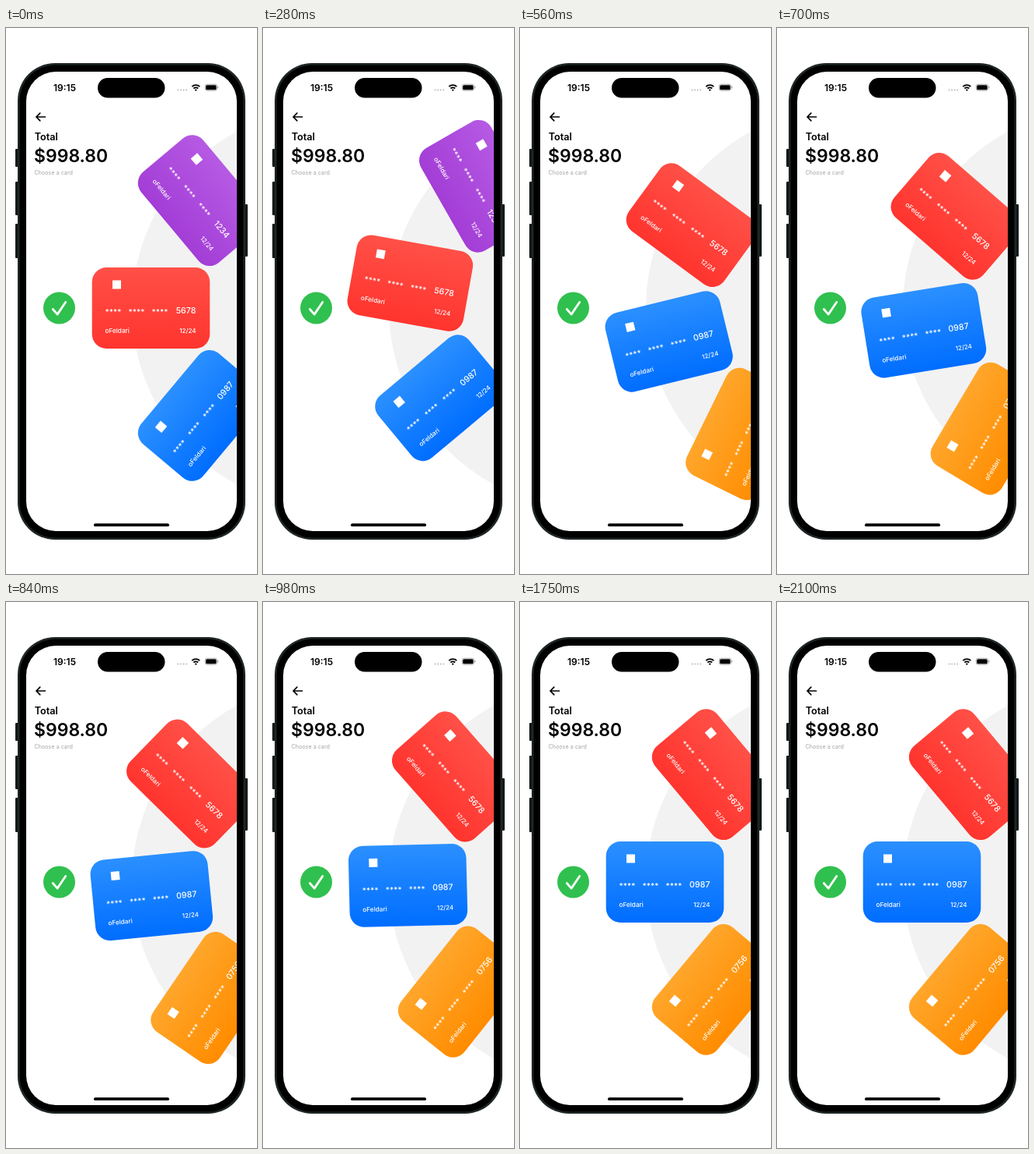
An HTML page for the animation above (2.16 s loop, 323 px wide and 700 px high).

```html
<!DOCTYPE html>
<html lang="en">
<head>
<meta charset="utf-8">
<title>Card wheel</title>
<style>
  html, body { margin: 0; width: 100%; height: 100%; overflow: hidden; background: #fff; }
  svg { display: block; width: 323px; height: 700px; font-family: Inter, Roboto, sans-serif; }
</style>
</head>
<body>
<svg viewBox="0 0 323 700">
  <defs>
    <clipPath id="screen"><rect x="26" y="56" width="271" height="589" rx="38"/></clipPath>
  </defs>

  <!-- phone body -->
  <g fill="#141818">
    <rect x="12" y="155" width="5" height="23" rx="1"/>
    <rect x="12" y="197" width="5" height="43" rx="1"/>
    <rect x="12" y="251" width="5" height="44" rx="1"/>
    <rect x="306" y="226" width="5" height="67" rx="1"/>
  </g>
  <rect x="15" y="45" width="293" height="611" rx="48" fill="#1f2627"/>
  <rect x="17.5" y="47.5" width="288" height="606" rx="46"/>
  <rect x="26" y="56" width="271" height="589" rx="38" fill="#fff"/>

  <g clip-path="url(#screen)">
    <circle cx="419" cy="359" r="257" fill="#f2f2f2"/>
    <g id="wheel"></g>
  </g>

  <!-- status bar -->
  <rect x="118" y="64" width="86.5" height="25.5" rx="12.75"/>
  <text x="61" y="81" font-size="12" font-weight="600">19:15</text>
  <path d="M221.5 79.5h12" stroke="#b5b5b5" stroke-width="1.8" stroke-linecap="round" stroke-dasharray="0 3.6"/>
  <g fill="none" stroke="#000" stroke-width="1.8">
    <path d="M239.3 75.2a7 7 0 0 1 10 0M241.4 77.5a4.1 4.1 0 0 1 5.8 0"/>
  </g>
  <path d="M242.8 79.2a2.2 2.2 0 0 1 3 0l-1.5 1.7z"/>
  <rect x="256.2" y="72.2" width="15.4" height="8" rx="2.5" fill="none" stroke="#999" stroke-width=".8"/>
  <rect x="257.2" y="73.2" width="13.4" height="6" rx="1.5"/>
  <rect x="272.3" y="74.8" width="1" height="2.8" rx=".5" fill="#999"/>

  <!-- header -->
  <path d="M50.5 114H39M43.8 109.2L39 114l4.8 4.8" fill="none" stroke="#000" stroke-width="1.7" stroke-linecap="round" stroke-linejoin="round"/>
  <text x="36.7" y="143.5" font-size="12.7" font-weight="600">Total</text>
  <text x="36" y="172.3" font-size="23" font-weight="600">$998.80</text>
  <text x="36.5" y="187.7" font-size="7.2" fill="#a3a3a3">Choose a card</text>

  <circle cx="68.5" cy="359" r="20.5" fill="#30c04f"/>
  <path d="M60.3 360.5l5.8 6.6 10.6-15.6" fill="none" stroke="#fff" stroke-width="2.8" stroke-linecap="round" stroke-linejoin="round"/>
  <rect x="113" y="635.3" width="97" height="3.8" rx="1.9"/>
</svg>

<script>
const LOOP = 2160, STEP = 70, SPACING = 50;
const HUB = "366.5 359";
const wheel = document.getElementById("wheel");

const cards = [
  { slot: -1, number: "1234", top: "#b65ae4", bottom: "#a33dd6" },
  { slot: 0, number: "5678", top: "#ff5047", bottom: "#ff342e" },
  { slot: 1, number: "0987", top: "#2b90ff", bottom: "#006dff" },
  { slot: 2, number: "0756", top: "#ffa62b", bottom: "#ff8c00" }
];

const cardMarkup = ({ number, top, bottom }, i) => `
  <g>
    <linearGradient id="fill${i}" x2="0" y2="1">
      <stop stop-color="${top}"/><stop offset="1" stop-color="${bottom}"/>
    </linearGradient>
    <rect x="110.7" y="307" width="151.6" height="104" rx="18.5" fill="url(#fill${i})"/>
    <g fill="#fff" font-weight="500">
      <rect x="137" y="323.5" width="11" height="11"/>
      <g font-size="10" text-anchor="middle">
        ${[138, 168, 198].map(x => `<text x="${x}" y="367.5">****</text>`).join("")}
      </g>
      <text x="244.5" y="366" font-size="10.7" text-anchor="end">${number}</text>
      <text x="127.5" y="391.4" font-size="8.2">oFeldari</text>
      <text x="244.5" y="391.4" font-size="8" text-anchor="end">12/24</text>
    </g>
  </g>`;

wheel.innerHTML = cards.map(cardMarkup).join("");
const nodes = [...wheel.children];

// Drag, release and settle: [ms, wheel turn in degrees]
const turns = [[0, 0], [280, 10.2], [560, 36.2], [840, 44.4], [980, 48.6], [1190, 49.9], [1330, 50]];

const slopes = turns.slice(1).map(([t, v], i) => (v - turns[i][1]) / (t - turns[i][0]));
const tangents = turns.map((_, i) => {
  const a = slopes[i - 1], b = slopes[i];
  return a && b ? 2 * a * b / (a + b) : 0;
});

// Monotone cubic through the turn points
function turnAt(time) {
  const i = turns.findIndex(([t]) => t > time) - 1;
  if (i < 0) return SPACING;
  const [t0, v0] = turns[i], [t1, v1] = turns[i + 1];
  const h = t1 - t0, u = (time - t0) / h, w = 1 - u;
  return v0 * (1 + 2 * u) * w * w + v1 * u * u * (3 - 2 * u)
    + h * u * w * (tangents[i] * w - tangents[i + 1] * u);
}

function draw(time) {
  const turn = turnAt(Math.floor(time / STEP) * STEP);
  nodes.forEach((node, i) =>
    node.setAttribute("transform", `rotate(${turn - SPACING * cards[i].slot} ${HUB})`));
}

const start = performance.now();
function tick() {
  draw((performance.now() - start) % LOOP);
  requestAnimationFrame(tick);
}
tick();
</script>
</body>
</html>
```
